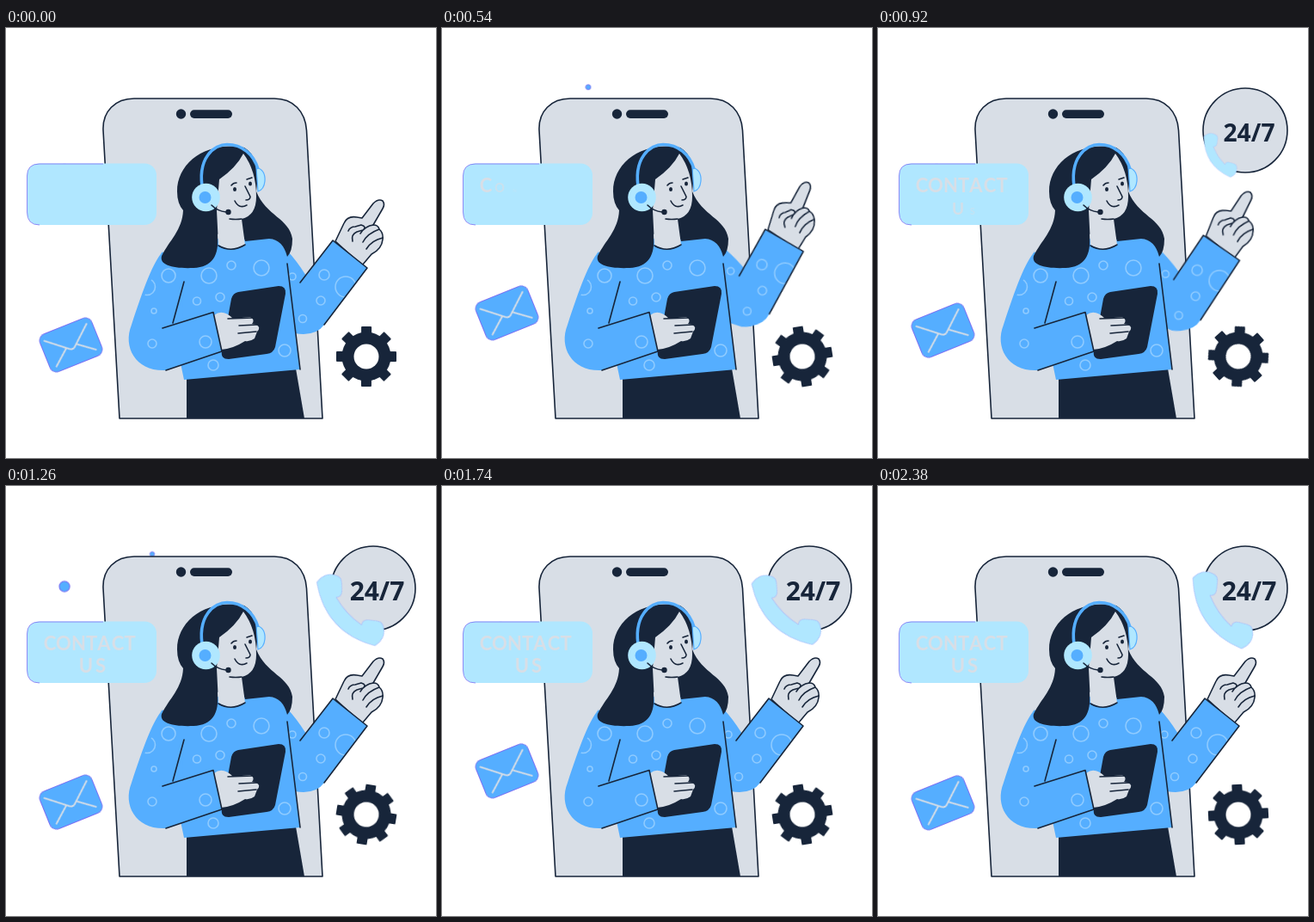
Recreate the animation shown at these times as an HTML page without scripts. Size 500x500 px, loop 2400 ms.

```html
<!DOCTYPE html>
<html lang="en">
<head>
<meta charset="utf-8">
<title>Contact us</title>
<style>
  @property --t { syntax: "<number>"; inherits: true; initial-value: 0; }
  :root { --dark: #17253a; --skin: #d8dee6; --blue: #55aeff; --pale: #b0e7ff; --edge: #7b70f4; }
  html, body { margin: 0; width: 100%; height: 100%; overflow: hidden; background: #fff; }
  svg { display: block; width: 100%; height: 100%; animation: clock 2400ms linear infinite; }
  .dark { fill: var(--dark); }
  .skin { fill: var(--skin); }
  .blue { fill: var(--blue); }
  .pale { fill: var(--pale); }
  .line { fill: none; stroke: var(--dark); stroke-width: 1.6; stroke-linecap: round; stroke-linejoin: round; }
  .outlined { stroke: var(--dark); stroke-width: 1.6; stroke-linejoin: round; }
  .rings { fill: none; stroke: #8fcbff; stroke-width: 1.6; }
  .dot { fill: var(--blue); stroke: var(--edge); stroke-width: 1; }
  text { text-anchor: middle; }

  /* --p runs 0 to 1 once the clock passes --start */
  .pop {
    --p: clamp(0, (var(--t) - var(--start)) / var(--span), 1);
    transform: scale(calc(var(--p)));
  }
  .letter {
    --start: calc(385 + 58 * var(--i)); --span: 150;
    opacity: calc(var(--p));
    font: 700 22px Lato, sans-serif; fill: var(--skin);
  }
  .badge { --start: 560; --span: 300; }
  .hours { --start: 680; --span: 256; font: 700 30px "Open Sans", sans-serif; }

  .arm { transform-origin: 292px 268px; animation: wave 2400ms infinite; }
  .bob { animation: bob 600ms cubic-bezier(.37, 0, .63, 1) infinite alternate; }
  .spin { animation: spin 2400ms linear infinite; }
  .handset { animation: ring 2400ms linear infinite; }
  .rise-top { animation: rise-top 800ms linear infinite; }
  .rise-left { animation: rise-left 800ms linear infinite; }
  .drift { animation: drift 800ms linear infinite; }

  @keyframes clock { to { --t: 2400; } }
  @keyframes wave {
    0%, 50%, 100% { transform: rotate(0deg); animation-timing-function: cubic-bezier(.37, 0, .63, 1); }
    25% { transform: rotate(-8.8deg); animation-timing-function: cubic-bezier(.37, 0, .63, 1); }
  }
  @keyframes bob { to { transform: translateY(-38px); } }
  @keyframes spin { to { transform: rotate(360deg); } }
  @keyframes ring {
    0%, 33% { transform: translate(-6px, 6px) rotate(60deg) scale(0); }
    38.3% { transform: translate(-3px, 4px) rotate(57deg) scale(.56); }
    45% { transform: translate(0, 0) rotate(50deg) scale(1); }
    52.5% { transform: translate(0, 0) rotate(47.5deg) scale(1); }
    62.5% { transform: translate(0, 0) rotate(45.5deg) scale(1); }
    83.3% { transform: translate(0, 0) rotate(44.5deg) scale(1); }
    100% { transform: translate(0, 0) rotate(56deg) scale(1); }
  }
  @keyframes rise-top {
    0%, 50% { transform: translate(170px, 87px) scale(.8); }
    80% { transform: translate(170px, 56px) scale(1); }
    82.5%, 100% { transform: translate(170px, 54px) scale(0); }
  }
  @keyframes rise-left {
    0%, 32.5% { transform: translate(68px, 162px) scale(.6); }
    62.5% { transform: translate(68px, 108px) scale(1.1); }
    65%, 100% { transform: translate(68px, 105px) scale(0); }
  }
  @keyframes drift {
    0%, 31.25% { transform: translate(430px, 255px) scale(0); }
    52.5% { transform: translate(455px, 239px) scale(1); }
    55%, 100% { transform: translate(455px, 238px) scale(0); }
  }
</style>
</head>
<body>
<svg viewBox="0 0 500 500">
  <defs>
    <clipPath id="armClip"><path id="armShape" d="M310 247 Q326 252 349 288 L380 247 L420 279 L370 345 Q360 359 336 355 L310 342 L304 270Z"/></clipPath>
    <clipPath id="shirtClip"><path d="M182 262 L246 247 H308 Q326 246 327 274 L342 397 L207 409 L203 392 L186 398 C152 400 138 372 147 345Z"/></clipPath>
    <rect id="bar" x="-35" y="-6" width="70" height="12" rx="1"/>
  </defs>

  <!-- dots that emerge from behind things -->
  <circle class="dot rise-top" r="3.2"/>
  <circle class="dot rise-left" r="6"/>
  <circle class="dot drift" r="4"/>

  <!-- phone -->
  <path class="skin outlined" d="M113 119 C112 97 127 82 149 82 H312 C334 82 348 97 349.5 119 L368 454 H132Z"/>
  <circle class="dark" cx="203.5" cy="100" r="5.7"/>
  <rect class="dark" x="214" y="95.3" width="49" height="9.6" rx="4.8"/>

  <!-- waving arm -->
  <g class="arm">
    <g class="skin outlined">
      <path d="M383 248 L393 227 Q397 218 408 220 L414 221 L427 204 Q433 198 438 201 Q441 205 438 210 L427 229 Q433 229 434 234 Q439 238 438 246 Q437 257 425 263 L414 276Z"/>
      <path class="line" d="M398 236 Q400 231 406 231 L413 229 Q420 231 415 235 L408 237 Q401 240 403 248 M412 239 Q418 230 427 229 M415 249 Q420 239 434 234 M419 257 Q425 247 438 244"/>
    </g>
    <use class="blue" href="#armShape"/>
    <g class="rings" clip-path="url(#armClip)">
      <circle cx="370" cy="287" r="6"/>
      <circle cx="395" cy="301" r="12"/>
      <circle cx="366" cy="317" r="5"/>
      <circle cx="345" cy="338" r="4.5"/>
      <circle cx="333" cy="289" r="4"/>
    </g>
    <path class="line" d="M342 296 L380 247 L420 279 L370 345"/>
  </g>

  <!-- body -->
  <path class="dark" d="M210 404 L337 396 L347 454 H210Z"/>
  <path class="blue" d="M180 262 L246 245 H308 Q326 246 327 274 L342 397 L207 409 L203 390Z"/>
  <path class="blue" d="M182 260 C170 275 161 300 146 345 C135 372 152 400 186 398 L251 376 L241 331 L205 340 L207 295Z"/>
  <g class="rings" clip-path="url(#shirtClip)">
    <circle cx="164" cy="301" r="9.5"/>
    <circle cx="189" cy="288" r="8"/>
    <circle cx="236" cy="288" r="9"/>
    <circle cx="262" cy="276" r="5"/>
    <circle cx="297" cy="279" r="9"/>
    <circle cx="222" cy="317.5" r="4.5"/>
    <circle cx="249" cy="313" r="5"/>
    <circle cx="172" cy="329" r="3"/>
    <circle cx="232" cy="365" r="7"/>
    <circle cx="170" cy="367" r="5"/>
    <circle cx="324" cy="375" r="7"/>
    <circle cx="241" cy="392" r="6"/>
  </g>
  <path class="line" d="M327 274 L342 397 M207 295 L194 343"/>

  <!-- tablet and the hand holding it -->
  <path class="dark" d="M270 307 L317 300 Q326 300 325 309 L313 371 Q311 378 303 379 L259 385 Q249 385 251 375 L262 315 Q264 308 270 307Z"/>
  <path class="skin" d="M242 334 Q252 326 264 338 L284 336 Q290 339 286 344 L291 345 Q297 348 292 353 L289 361 Q284 365 278 364 Q264 373 250 374Z"/>
  <path class="line" d="M258 338 L287 337 M271 346 L292 345 M270 355 L291 353"/>
  <path class="line" d="M182 349 L241 330.5 L251 376 L186 398"/>

  <!-- head -->
  <path class="dark" d="M277 139 C235 131 199 155 199 190 Q199 204 206 212 C205 235 190 247 181 265 C178 276 195 280 218 279 C240 278 248 265 246 240 L270 225 L278 248 L306 245 Q322 246 327 266 Q333 260 333 245 C330 222 302 218 291 190 Q297 150 277 139Z"/>
  <path class="skin" d="M276 146 Q268 162 248 176 L245 212 L247 252 Q262 262 278 252 L274 222 Q291 218 291 196 Q291 166 276 146Z"/>
  <path class="line" d="M247 253 Q262 262 278 252 M260 222 Q267 223 274 222"/>
  <g class="dark">
    <ellipse cx="266" cy="187.5" rx="2" ry="2.6"/>
    <ellipse cx="284" cy="181" rx="2" ry="2.6"/>
  </g>
  <path class="line" d="M262 183 Q264 180 268 180 M280 176 L286 174 M278 184 L284 196 Q284 200 279 200 M266 201 Q271 211 280 206"/>

  <!-- headset -->
  <path d="M291 162 Q302 165 301 178 Q300 188 293 190Z" fill="#b0e7ff" stroke="#55aeff" stroke-width="1.2"/>
  <path d="M229 190 C221 150 243 135.5 257 135.5 C275 135.5 288 147 293 164" fill="none" stroke="#55aeff" stroke-width="3.6"/>
  <circle class="pale" cx="232.5" cy="197" r="16.3"/>
  <circle class="blue" cx="231.5" cy="197" r="7"/>
  <path class="line" d="M239 206 Q246 213 256 214"/>
  <circle class="dark" cx="258.5" cy="214" r="3.2"/>

  <!-- speech bubble -->
  <rect class="pale" x="24.5" y="157.5" width="150.5" height="71.5" rx="14"/>
  <path d="M113 158 H39 Q24.500 158 24.500 172 V214 Q24.500 229 39 229" fill="none" stroke="#7b70f4" stroke-width=".8"/>
  <g transform="translate(51 191)"><text class="pop letter" style="--i:0">C</text></g>
  <g transform="translate(67 191)"><text class="pop letter" style="--i:1">O</text></g>
  <g transform="translate(84.5 191)"><text class="pop letter" style="--i:2">N</text></g>
  <g transform="translate(99.5 191)"><text class="pop letter" style="--i:3">T</text></g>
  <g transform="translate(114 191)"><text class="pop letter" style="--i:4">A</text></g>
  <g transform="translate(130 191)"><text class="pop letter" style="--i:5">C</text></g>
  <g transform="translate(144 191)"><text class="pop letter" style="--i:6">T</text></g>
  <g transform="translate(93 217)"><text class="pop letter" style="--i:7">U</text></g>
  <g transform="translate(110 217)"><text class="pop letter" style="--i:8">S</text></g>

  <!-- envelope -->
  <g class="bob">
    <g transform="translate(75.5 368.5) rotate(-22)">
      <rect x="-32.5" y="-23.5" width="65" height="47" rx="8" fill="#55aeff" stroke="#7b70f4"/>
      <path d="M-27 -16 L-3 4 Q0 6 3 4 L26 -16 M-25 17 L-7 2 M25 16 L7 2" fill="none" stroke="#d8dee6" stroke-width="1.8" stroke-linecap="round"/>
    </g>
  </g>

  <!-- gear -->
  <g transform="translate(419 382)">
    <g class="spin dark">
      <use href="#bar"/>
      <use href="#bar" transform="rotate(45)"/>
      <use href="#bar" transform="rotate(90)"/>
      <use href="#bar" transform="rotate(135)"/>
      <circle r="28.5"/>
      <circle r="14.5" fill="#fff"/>
    </g>
  </g>

  <!-- support badge -->
  <g transform="translate(427 119)">
    <circle class="pop badge skin outlined" r="49"/>
  </g>
  <g transform="translate(431.5 122)">
    <text class="pop hours dark" y="10.5">24/7</text>
  </g>
  <g transform="translate(401 143.5)">
    <path class="handset pale" d="M-50 8 Q-53 -9 -39 -15 Q-34 -17 -30 -13 L-22 -6 Q-18 -1 -22 3 Q0 8 22 3 Q18 -1 22 -6 L30 -13 Q34 -17 39 -15 Q53 -9 50 8 Q0 40 -50 8Z" stroke="#9aa5fa" stroke-width=".5"/>
  </g>
</svg>
</body>
</html>
```
